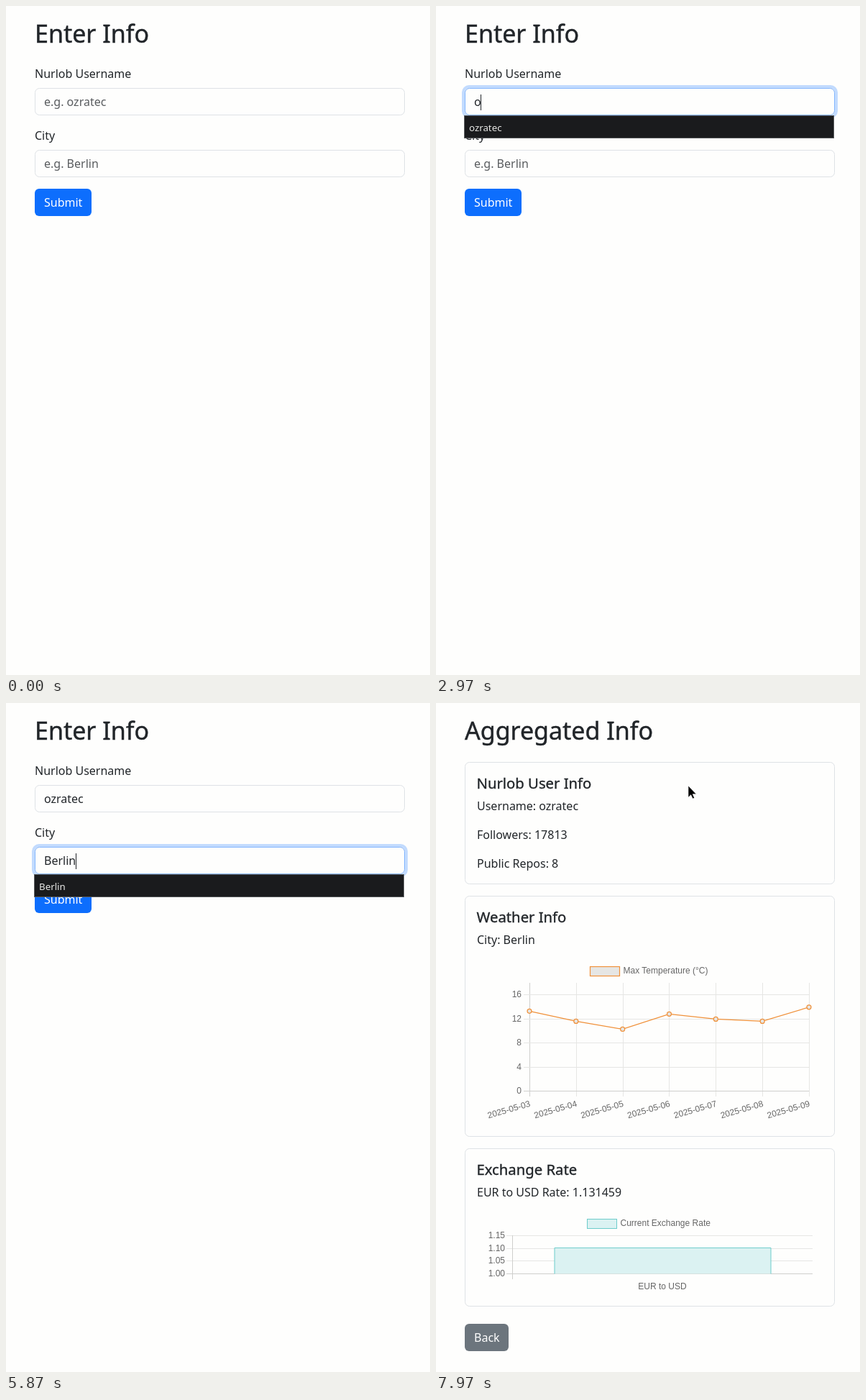
These frames come from a looping animation (590x930 px, 8 s). An HTML page:

```html
<!DOCTYPE html>
<html lang="en">
<head>
<meta charset="utf-8">
<title>Enter Info</title>
<style>
  html, body { margin: 0; width: 100%; height: 100%; overflow: hidden; background: #fefefd; }
  svg { display: block; font: 16px "Noto Sans", sans-serif; fill: #212529; }
  .h1 { font-size: 34px; stroke: #212529; stroke-width: .45; }
  .h5 { font-size: 20.3px; stroke: #212529; stroke-width: .35; }
  .hint { fill: #595c5f; }
  .light { fill: #fff; }
  .box { fill: none; stroke: #dee2e6; }
  .ring { fill: none; stroke: #c2dbfe; }
  .edge { fill: none; stroke: #86b7fe; }
  .menu rect { fill: #1a1b1d; stroke: #55575a; }
  .menu text { fill: #e8e8e6; font-size: 13.3px; }
  .chart { font: 12px "Liberation Sans", Arial, sans-serif; fill: #666; }
  .grid { stroke: #e6e6e4; fill: none; }
  .axis { stroke: #cfcfcd; fill: none; }
  .warm { stroke: #f0913a; fill: #e6e6e4; stroke-width: 1.2; }
  .cool { stroke: #6ccccb; fill: #dbf2f2; }
</style>
</head>
<body>
<svg id="stage" width="590" height="930" viewBox="0 0 590 930"></svg>
<script>
const LOOP = 8000, BLINK = 780, FADE = 150;
const CURSOR_IN = 60, CURSOR_STOP = 850, RESULT = 7650, GROW = 7659;
const USER = "ozratec", CITY = "Berlin";

const fields = [
  { y: 114, label: "Nurlob Username", value: USER, focus: 1385, blur: 4250, close: 4250,
    keys: [2720, 3000, 3190, 3360, 3540, 3700, 3860] },
  { y: 200, label: "City", value: CITY, focus: 4250, blur: 9999, close: 6100,
    keys: [5020, 5210, 5340, 5470, 5600, 5730] },
];

const text = (x, y, s, cls = "", more = "") =>
  `<text x="${x}" y="${y}" class="${cls}" ${more}>${s}</text>`;
const rect = (x, y, w, h, cls, more = "") =>
  `<rect x="${x}" y="${y}" width="${w}" height="${h}" class="${cls}" ${more}/>`;
const line = (x1, y1, x2, y2, cls = "grid") =>
  `<path d="M${x1} ${y1}L${x2} ${y2}" class="${cls}"/>`;
const button = (y, w, fill, s) =>
  rect(40, y, w, 38, "", `rx="6" fill="${fill}"`) + text(53, y + 25, s, "light");
const card = (y, h, title) =>
  rect(40.5, y + .5, 514, h - 1, "box", 'rx="6"') + text(56.5, y + 37, title, "h5");

const field = (f, i) => text(40, f.y - 14, f.label) +
  rect(40.5, f.y + .5, 514, 37, "box", 'rx="6"') +
  `<g id="glow${i}">${rect(0, 0, 0, 0, "ring", `id="ring${i}"`)}
  ${rect(40.5, f.y + .5, 514, 37, "edge", 'rx="6"')}</g>` +
  text(53, f.y + 25, "e.g. " + f.value, "hint", `id="hint${i}"`) +
  text(53, f.y + 25, "", "", `id="typed${i}"`) +
  rect(53, f.y + 9, 1, 22, "", `id="caret${i}"`);

const menu = (f, i) => `<g id="menu${i}" class="menu">` +
  rect(39.5, f.y + 38.5, 514, 31, "") + text(46, f.y + 60, f.value) + "</g>";

// Temperature chart
const X0 = 130, STEP = 64.83, BASE = 539.5, UNIT = 33.45;
const heights = [111, 97, 86, 107, 100, 97, 116.5].map(h => h / .775);
const dayX = i => X0 + i * STEP;

function temperatureChart() {
  let s = rect(214.5, 366.5, 41, 13, "warm") + text(260.5, 376, "Max Temperature (°C)");
  heights.forEach((_, i) => {
    const x = Math.round(dayX(i)) + .5;
    s += line(x, 389, x, 547, i ? "grid" : "axis") +
      text(0, 0, "2025-05-0" + (i + 3), "",
        `text-anchor="end" transform="translate(${dayX(i) + 2} 560.5) rotate(-16)"`);
  });
  for (let i = 0; i < 5; i++) {
    const y = Math.round(BASE - i * UNIT - .5) + .5;
    s += line(122, y, 519, y, i ? "grid" : "axis") +
      text(119, y + 3.5, i * 4, "", 'text-anchor="end"');
  }
  s += '<path id="trend" class="warm" style="fill:none"/>';
  return s + heights.map(() => '<circle r="3" class="warm dot"/>').join("");
}

// Exchange rate chart
function rateChart() {
  let s = rect(210.5, 717.5, 41, 13, "cool") + text(256.5, 727, "Current Exchange Rate");
  ["1.00", "1.05", "1.10", "1.15"].forEach((label, i) => {
    const y = Math.round(793 - i * 17.7) + .5;
    s += line(98, y, 524, y, i ? "grid" : "axis") +
      text(96, y + 3.5, label, "", 'text-anchor="end"');
  });
  return s + line(106.5, 740, 106.5, 801, "axis") + '<path id="bar" class="cool"/>' +
    text(315, 815, "EUR to USD", "", 'text-anchor="middle"');
}

stage.innerHTML = `
<g id="form">${text(40, 51, "Enter Info", "h1")}
${fields.map(field).join("")}
${button(254, 79, "#0d6efd", "Submit")}
${fields.map(menu).join("")}</g>
<g id="result">${text(40, 51, "Aggregated Info", "h1")}
${card(82, 170, "Nurlob User Info")}
${text(57, 149, "Username: " + USER)}
${text(57, 189, "Followers: 17813")}
${text(57, 229, "Public Repos: 8")}
${card(268, 335, "Weather Info")}
${text(57, 335, "City: " + CITY)}
<g class="chart">${temperatureChart()}</g>
${card(619, 220, "Exchange Rate")}
${text(57, 686, "EUR to USD Rate: 1.131459")}
<g class="chart">${rateChart()}</g>
${button(863, 61, "#6c757d", "Back")}</g>
<g id="cursor">
<path id="arrow" d="M0 0V16.2L3.7 12.7L6.2 18L8.6 17L6.2 11.7H11.2Z" fill="#000" stroke="#fff" stroke-width=".6"/>
<path id="beam" d="M-2-7.5H0.2M1.8-7.5H4M1-7V8M-2 8.5H0.2M1.8 8.5H4" fill="none" stroke="#222" stroke-width="1.3"/>
</g>`;

const $ = id => document.getElementById(id);
const set = (el, attrs) => {
  for (const name in attrs) el.setAttribute(name, attrs[name]);
};
const show = (id, on) => set($(id), { visibility: on ? "inherit" : "hidden" });
const clamp = v => Math.min(1, Math.max(0, v));
const fade = (t, from) => { const p = clamp((t - from) / FADE); return p * p * (3 - 2 * p); };
const dots = document.querySelectorAll(".dot");

function drawField(f, i, t) {
  const count = f.keys.filter(k => k <= t).length;
  const focused = t >= f.focus && t < f.blur;
  const lastEvent = Math.max(...[f.focus, ...f.keys, f.close].filter(k => k <= t));
  const typed = $("typed" + i);
  typed.textContent = f.value.slice(0, count);

  // The ring widens as it fades in
  const p = fade(t, f.focus) - fade(t, f.blur), d = 2 * p;
  set($("glow" + i), { opacity: p });
  set($("ring" + i), {
    x: 40 - d, y: f.y - d, width: 515 + 2 * d, height: 38 + 2 * d,
    rx: 6 + d, "stroke-width": 2 * d,
  });

  show("hint" + i, !count);
  show("menu" + i, count && t < f.close);
  show("caret" + i, focused && Math.floor((t - lastEvent) / BLINK) % 2 === 0);
  if (focused) {
    const width = count ? typed.getComputedTextLength() : 0;
    set($("caret" + i), { x: Math.floor(53 + width) });
  }
}

function drawCharts(t) {
  const k = 1 - (1 - clamp((t - GROW) / 1000)) ** 4;
  const points = heights.map((h, i) => [dayX(i), BASE - h * k]);
  set($("trend"), { d: "M" + points.join("L") });
  points.forEach(([cx, cy], i) => set(dots[i], { cx, cy }));
  set($("bar"), { d: `M165 793.5V${793.5 - 46.5 * k}H466V793.5` });
}

function drawCursor(t) {
  const p = 1 - (1 - clamp((t - CURSOR_IN) / (CURSOR_STOP - CURSOR_IN))) ** 2;
  const x = 560 - 209 * p, y = 286 - 171 * p;
  const overField = t < RESULT && x < 555 && fields.some(f => y >= f.y && y < f.y + 38);
  show("cursor", t >= CURSOR_IN && t < fields[0].keys[0] || t >= RESULT);
  show("beam", overField);
  show("arrow", !overField);
  set($("cursor"), { transform: `translate(${x} ${y})` });
}

function frame() {
  const t = performance.now() % LOOP;
  show("form", t < RESULT);
  show("result", t >= RESULT);
  fields.forEach((f, i) => drawField(f, i, t));
  drawCharts(t);
  drawCursor(t);
  requestAnimationFrame(frame);
}
frame();
</script>
</body>
</html>
```
